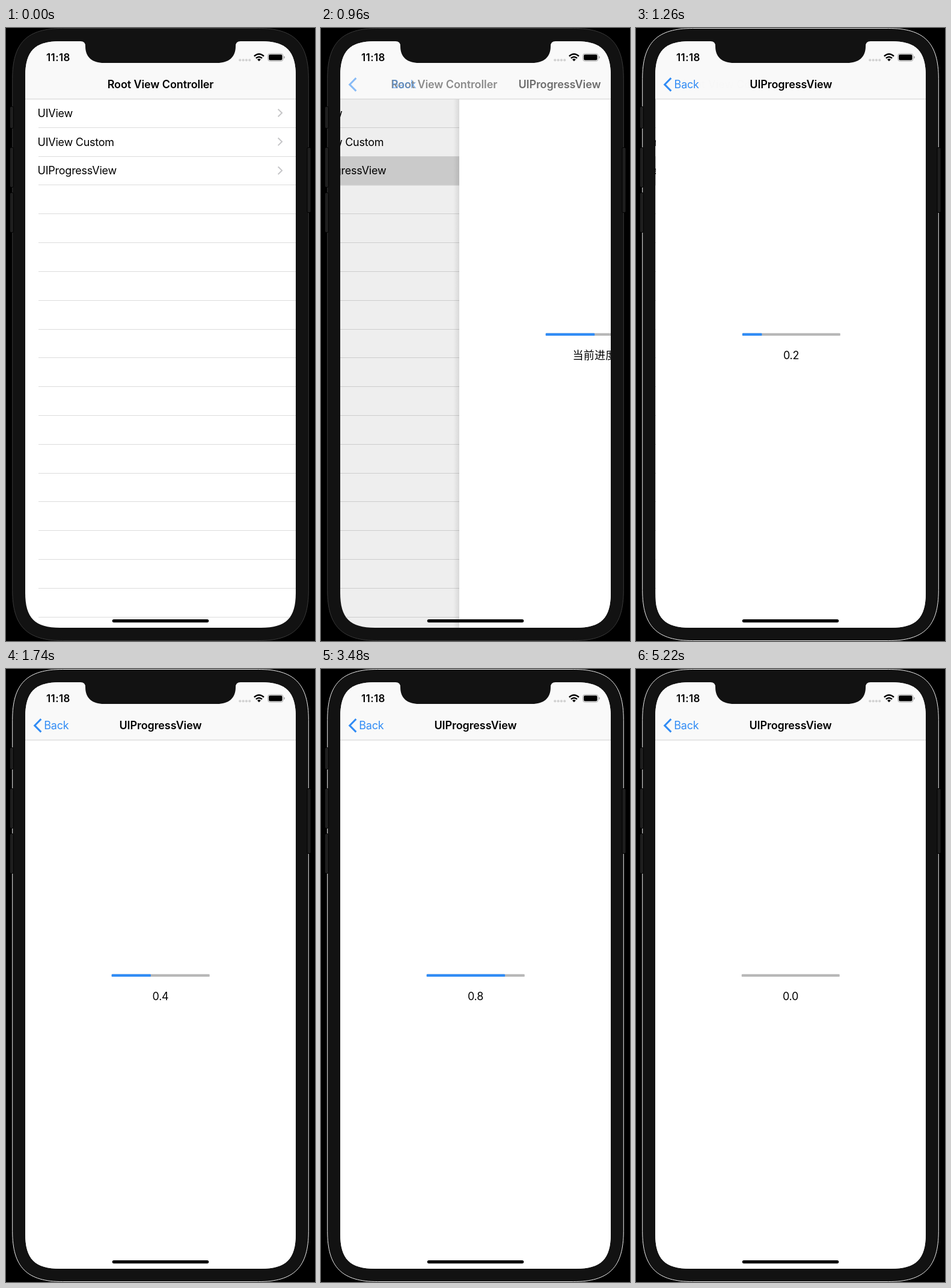
Animation, 514 px wide and 1018 px high, one loop 5.28 s. Source, as an HTML page:

```html
<!DOCTYPE html>
<html lang="zh">
<head>
<meta charset="utf-8">
<title>Progress view demo</title>
<style>
  html, body { margin: 0; width: 100%; height: 100%; overflow: hidden; background: #000; }
  svg { display: block; width: 514px; height: 1018px; }
  text { font: 400 18px Inter, "Noto Sans CJK SC", "Noto Sans CJK", sans-serif; letter-spacing: -0.25px; }
  .bold { font-weight: 600; letter-spacing: -0.1px; }
  .mid { text-anchor: middle; }
  .blue { fill: #318cf5; }
  .stroke { fill: none; stroke-linecap: square; }
</style>
</head>
<body>
<svg viewBox="0 0 514 1018">
  <defs>
    <clipPath id="screen"><path id="glass"/></clipPath>
    <linearGradient id="fade"><stop offset="0" stop-opacity="0"/><stop offset="1" stop-opacity=".09"/></linearGradient>
  </defs>

  <!-- phone body -->
  <rect width="514" height="1018"/>
  <path id="edge" fill="#121212"/>
  <g fill="#1f1f1f" stroke="#000">
    <rect x="6.5" y="130.5" width="6" height="36" rx="2"/>
    <rect x="6.5" y="198.5" width="6" height="66" rx="2"/>
    <rect x="6.5" y="273.5" width="6" height="66" rx="2"/>
    <rect x="501" y="198.5" width="6" height="108" rx="2"/>
  </g>

  <g clip-path="url(#screen)">
    <rect x="32" y="22" width="450" height="974" fill="#fff"/>
    <g id="list">
      <rect id="press" x="32" y="213" width="450" height="48.5" fill="#d8d8d8"/>
      <g id="lines" stroke="#dcdcdc"></g>
      <g id="rows"></g>
    </g>
    <rect id="dim" x="32" y="118" width="450" height="878"/>

    <g id="page">
      <rect x="22" y="118" width="10" height="878" fill="url(#fade)"/>
      <rect x="32" y="118" width="450" height="878" fill="#fff"/>
      <rect x="175.7" y="506.7" width="163" height="4.4" rx="1.2" fill="#b8b8b8"/>
      <rect id="bar" class="blue" x="175.7" y="506.7" height="4.4" rx="1.2"/>
      <text id="label" class="mid" x="257" y="549.5"></text>
    </g>

    <!-- navigation bar -->
    <rect x="32" y="22" width="450" height="96" fill="#f9f9f9"/>
    <path d="M32 118H482" stroke="#cfcfcf"/>
    <text id="oldTitle" class="bold mid" x="257" y="100.3">Root View Controller</text>
    <text id="newTitle" class="bold mid" x="257" y="100.3">UIProgressView</text>
    <path id="arrow" class="stroke" d="M57.3 84.2L47.7 93.9L57.3 103.6" stroke="#318cf5" stroke-width="3"/>
    <text id="back" class="blue" x="63.3" y="100.3">Back</text>

    <!-- status bar -->
    <path fill="#121212" d="M124 21V22Q132 22 132 30C132 49 144 58 163 58H351C370 58 382 49 382 30Q382 22 390 22V21Z"/>
    <text class="bold" x="67" y="55.2" style="font-size:17px;letter-spacing:.4px">11:18</text>
    <g fill="#d2d2d2">
      <circle cx="389.3" cy="53.3" r="2.1"/><circle cx="394.6" cy="53.3" r="2.1"/>
      <circle cx="399.9" cy="53.3" r="2.1"/><circle cx="405.2" cy="53.3" r="2.1"/>
    </g>
    <g fill="none" stroke="#000" stroke-width="2.4">
      <path d="M412.8 46.8Q420.9 39.6 429 46.8"/>
      <path d="M415.8 50.2Q420.9 45.6 426 50.2"/>
      <path d="M418 52.2Q420.9 50 423.8 52.2L420.9 55.2Z" fill="#000" stroke="none"/>
    </g>
    <rect x="435.5" y="42.5" width="25.5" height="12.6" rx="3.8" fill="none" stroke="#a6a6a6"/>
    <rect x="437" y="44" width="22.5" height="9.6" rx="2.4"/>
    <path d="M462.2 46.6Q464 47.2 464 48.8T462.2 51Z" fill="#a6a6a6"/>

    <rect x="176.7" y="982" width="160.6" height="5.2" rx="2.6"/>
  </g>
</svg>
<script>
const LOOP = 5280, STEP = 60;
const PUSH = 871, SPRING = 0.0211;
const TOUCH = 780, TICK0 = 990, TICK = 200;
const WIDTH = 450, ROW = 47.83;
const $ = id => document.getElementById(id);

// rounded box whose corners ease into the straight sides:
// r is where a corner starts, c where its control points sit
function smoothBox(l, t, r, b, size, c) {
  return `M${l + size} ${t}H${r - size}C${r - c} ${t} ${r} ${t + c} ${r} ${t + size}
    V${b - size}C${r} ${b - c} ${r - c} ${b} ${r - size} ${b}
    H${l + size}C${l + c} ${b} ${l} ${b - c} ${l} ${b - size}
    V${t + size}C${l} ${t + c} ${l + c} ${t} ${l + size} ${t}Z`;
}
$('edge').setAttribute('d', smoothBox(10.7, 0.5, 503.3, 1017.5, 84, 24));
$('glass').setAttribute('d', smoothBox(32, 22, 482, 996, 58, 16));

$('lines').innerHTML = Array.from({ length: 18 }, (_, i) =>
  `<path d="M54 ${Math.floor(165.2 + ROW * i) + 0.5}H482"/>`).join('');

$('rows').innerHTML = ['UIView', 'UIView Custom', 'UIProgressView'].map((name, i) => {
  const y = 141 + ROW * i;
  return `<text x="52.6" y="${y + 6.7}">${name}</text>
    <path class="stroke" d="M453.3 ${y - 5.6}l5.7 5.6l-5.7 5.6" stroke="#c6c6c8" stroke-width="2"/>`;
}).join('');

const shift = (id, x) => $(id).setAttribute('transform', `translate(${x.toFixed(2)} 0)`);
const alpha = (id, a) => $(id).setAttribute('opacity', a.toFixed(3));

// critically damped spring, 0 to 1
function pushed(t) {
  const x = Math.max(0, t - PUSH) * SPRING;
  return 1 - (1 + x) * Math.exp(-x);
}

// counts up to ten, rests one tick, counts back down
function tenths(t) {
  const n = Math.floor((t - TICK0) / TICK) + 1;
  return n <= 10 ? n : Math.max(0, 21 - n);
}

function edgeColor(t) {
  if (t < 60) return '#3a3a3a';
  if (t < 720) return '#a8a8a8';
  return t < 1200 ? '#3a3a3a' : '#f0f0f0';
}

function draw(t) {
  const p = pushed(t), rest = 1 - p;
  shift('list', -0.3 * WIDTH * p);
  shift('page', WIDTH * rest + (p ? 0 : 20));
  alpha('dim', 0.12 * p);
  alpha('press', t >= TOUCH ? 1 : 0);

  shift('oldTitle', -93 * p);
  alpha('oldTitle', rest);
  shift('newTitle', 318 * rest);
  alpha('newTitle', p);
  shift('back', 123 * rest);
  alpha('back', p);
  alpha('arrow', p);

  const ticking = t >= TICK0, n = ticking ? tenths(t) : 5;
  $('bar').setAttribute('width', 16.3 * n);
  $('label').textContent = ticking ? (n / 10).toFixed(1) : '当前进度';
  $('label').style.letterSpacing = ticking ? '' : '0.3px';
  $('edge').setAttribute('stroke', edgeColor(t));
}

const start = performance.now();
function frame() {
  const t = (performance.now() - start) % LOOP;
  draw(Math.floor(t / STEP) * STEP);
  requestAnimationFrame(frame);
}
draw(0);
requestAnimationFrame(frame);
</script>
</body>
</html>
```
